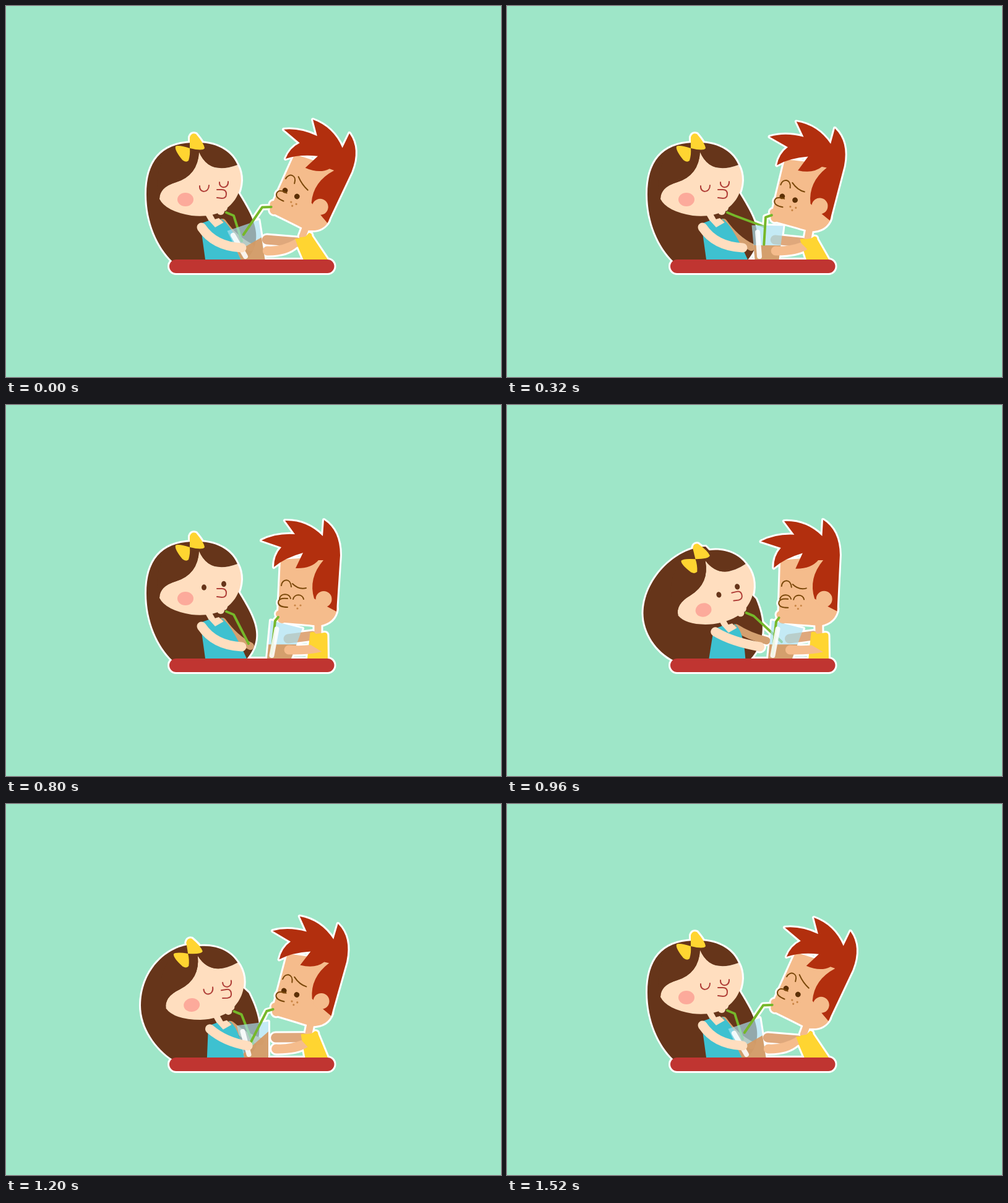
Recreate the animation shown at these times as an HTML page with a canvas. Size 800x600 px, loop 1.6 s.

```html
<!DOCTYPE html>
<html lang="en">
<head>
<meta charset="utf-8">
<title>Shared drink</title>
<style>
html, body { margin: 0; width: 100%; height: 100%; overflow: hidden; background: #9ee6c8; }
canvas { display: block; width: 800px; height: 600px; }
</style>
</head>
<body>
<canvas id="stage" width="800" height="600"></canvas>
<script>
const ctx = document.getElementById('stage').getContext('2d');
const LOOP = 1600, STEP = 80, HALO = 6, BASE = 410;
const C = {
  bg: '#9ee6c8', table: '#c03531', brown: '#66351a', skin: '#ffdebf', shade: '#d4a070',
  teal: '#3ec1d0', yellow: '#ffd531', blush: '#fcaa9b', nose: '#b03f38',
  red: '#b22f0e', tan: '#f5bc8c', tanDark: '#dfa87c', ink: '#7a480a', eye: '#5c3005',
  freckle: '#c98545', straw: '#76b82a', glass: '#a9e0f0', juice: '#d69a62'
};

// neck and lean place the boy, reach bends the girl forward,
// cup / skew / slosh set the glass, tip is the end of the girl's straw.
const hers = { neckX: 480, neckY: 372, lean: 21.5, reach: 0, cup: 399, skew: -16, slosh: .14, tipX: 381, tipY: 380 };
const pull = { neckX: 487, neckY: 375, lean: 10.8, reach: 0, cup: 420, skew: 1, slosh: 0, tipX: 416, tipY: 357 };
const sip = { neckX: 505, neckY: 368, lean: 2.2, reach: 0, cup: 441.5, skew: 12, slosh: -.14, tipX: 386, tipY: 386 };
const rest = { ...sip, lean: 0, slosh: .05, tipX: 392 };
const grab = { ...rest, lean: -1.3, reach: 1, tipX: 462, tipY: 382 };
const tug = { ...hers, neckX: 490, neckY: 370, lean: 12, reach: .48, cup: 404.5, skew: -6, slosh: .3, tipX: 401, tipY: 392 };
const timeline = [[0, hers], [320, pull], [480, sip], [800, rest], [1040, grab], [1200, tug], [1520, hers]];

function poseAt(t) {
  const i = Math.max(1, timeline.findIndex(([at], n) => n && t < at) % timeline.length || 0);
  const last = t >= 1520;
  const [t0, a] = timeline[last ? 5 : i - 1], [t1, b] = timeline[last ? 6 : i];
  const u = Math.min(1, (t - t0) / (t1 - t0)), k = u * u * (3 - 2 * u);
  const p = {};
  for (const key in a) p[key] = a[key] + (b[key] - a[key]) * k;
  if (b === sip) p.neckY -= 8 * Math.sin(Math.PI * u);
  return p;
}

function turn(deg, x, y) {
  const a = deg * Math.PI / 180, c = Math.cos(a), s = Math.sin(a);
  return [x * c - y * s, x * s + y * c];
}

// A head is drawn around a pivot (px, py) that has moved to (x, y) and turned.
function pointOn({ x, y, deg, px, py }, qx, qy) {
  const [dx, dy] = turn(deg, qx - px, qy - py);
  return [x + dx, y + dy];
}

function posed({ x, y, deg, px, py }, draw) {
  ctx.save();
  ctx.translate(x, y);
  ctx.rotate(deg * Math.PI / 180);
  ctx.translate(-px, -py);
  draw();
  ctx.restore();
}

let halo = false;

function fill(color, d, alpha = 1) {
  const p = new Path2D(d);
  ctx.fillStyle = halo ? '#fff' : color;
  ctx.globalAlpha = halo ? 1 : alpha;
  ctx.fill(p);
  if (halo) {
    ctx.strokeStyle = '#fff';
    ctx.lineWidth = HALO;
    ctx.stroke(p);
  }
  ctx.globalAlpha = 1;
}

function line(color, width, d) {
  ctx.strokeStyle = halo ? '#fff' : color;
  ctx.lineWidth = width + (halo ? HALO : 0);
  ctx.stroke(new Path2D(d));
}

function oval(color, x, y, rx, ry = rx) {
  fill(color, `M${x - rx},${y} a${rx},${ry} 0 1 1 ${2 * rx},0 a${rx},${ry} 0 1 1 ${-2 * rx},0Z`);
}

function girlFace(awake) {
  oval(C.skin, 352, 326, 6);
  oval(C.skin, 347, 332, 6);
  fill(C.skin, `M248,312 Q248,293 275,285 Q310,274 312,236 Q328,274 374,257 Q380,268 380,282
    C379,308 364,323 350,332 Q330,342 300,339 Q258,332 248,312Z`);
  fill(C.brown, `M248,312 C235,260 262,221 310,221 C345,221 366,238 374,257
    Q328,274 312,236 Q310,274 275,285 Q248,293 248,312Z`);
  oval(C.blush, 290, 313, 13, 11);
  line(C.nose, 2, 'M341,297 L349,297 Q356,297 356,304 Q356,311 349,311 L341,310');
  if (awake) {
    oval(C.brown, 320, 295, 4, 4.7);
    oval(C.brown, 352, 289.5, 4, 4.7);
  } else {
    line(C.nose, 2, 'M313,291 C312,303 328,303 328,290 M345,285 C344,296 360,296 359,284');
  }
  fill(C.yellow, 'M297,230 L297,212 Q300,204 307,207 Q320,222 321,230 Q318,235 297,230Z');
  fill(C.yellow, 'M297,230 Q278,224 274,227 Q272,233 285,249 Q291,254 295,250 Q298,240 297,230Z');
}

function boyFace(squint, lean) {
  oval(C.tan, 443, 338, 6);
  oval(C.tan, 447, 346, 7);
  fill(C.tan, 'M445,250 L441,335 Q441,350 452,352 Q490,355 507,357 Q533,352 536,330 L520,245Z');
  fill(C.red, `M414,219 Q437,207 468,209 L452,187 Q487,186 513,212 L515,186 Q541,203 541,243 L535,334
    L520,326 L499,313 Q489,280 514,251 L506,251 Q494,265 469,264 L481,239 Q452,247 434,262
    Q434,243 446,230Z`);
  oval(C.tan, 514.5, 314, 13);
  oval(C.tan, 448, 320, 7);
  if (squint) {
    line(C.ink, 2, 'M443,313 C445,304 459,304 461,313 M465,314 C467,305 480,305 482,314');
  } else {
    oval(C.eye, 452, 310, 4.4);
    oval(C.eye, 473.5, 312, 4.4);
  }
  line(C.ink, 2, 'M456,313 Q441,311 441,320 Q442,327 456,327');
  const browY = 289 - .35 * lean;
  line(C.ink, 2, `M446,292 C447,281 461,279 462,294 M464,${browY} Q474,${browY + 10} 486,296`);
  oval(C.freckle, 468, 324, 1.6);
  oval(C.freckle, 477, 324, 1.6);
  oval(C.freckle, 472, 329, 1.6);
}

function girl({ reach: g }, head, awake) {
  const [tx, ty] = pointOn(head, 300 + 24 * g, 221 - 9 * g);
  const lx = 227 - 9 * Math.sin(Math.PI * g), ly = 305 + 43 * g;
  const rx = 374 + 38 * g, ry = 300 + 25 * g * g;
  fill(C.brown, `M${tx},${ty} C${tx - 50},${ty + 2} ${lx},${ly - 53} ${lx},${ly}
    C${lx},${ly + 45 - 18 * g} ${245 - 5 * g},${390 + 12 * g} 269,413 L${388 + 6 * g},412
    C421,${374 + 10 * g} ${rx + 24 - 15 * g},${ry + 40 - 13 * g} ${rx},${ry}Z`);

  const at = (x, y) => `${x + 27 * g},${y + 14 * g}`;
  line(C.shade, 12, `M${at(350, 350)} Q${at(370, 378 - 20 * g)} ${395 + 33 * g},${390 - 12 * g}`);
  line(C.skin, 10, `M${at(327, 336)} L${at(335, 350)}`);
  fill(C.skin, `M${at(327, 348)} L${at(344, 343)} L${at(352, 351)} L${at(338, 359)}Z`);
  fill(C.teal, `M${at(314, 352)} L${at(328, 347)} L${at(338, 358)} L${at(352, 350)} L${at(346, 343)}
    Q${at(362, 350)} ${389 - 5 * g},${BASE} L${322 + 6 * g},${BASE}Z`);
  posed(head, () => girlFace(awake));
}

function boy({ neckX, neckY, lean }, head, left, hand, squint) {
  const rx = neckX + 14.5, ry = neckY - .23 * lean;
  line(C.tanDark, 15, `M${hand} L${left[0] + 4},${left[1] + 5}`);
  line(C.tan, 11, `M${pointOn(head, 505, 350)} L${neckX - 1},${neckY + 1}`);
  fill(C.yellow, `M${left} Q${left[0] + 1},${left[1] - 1} ${left[0] + 6},${left[1] - 1}
    L${neckX - 4},${neckY + 2} L${neckX + 4},${neckY + 1} L${rx - 5},${ry}
    Q${rx},${ry} ${rx},${ry + 5} L520,${BASE} L${487 - .3 * lean},${BASE}Z`);
  posed(head, () => boyFace(squint, lean));
}

function glass({ cup, skew, slosh }, splash) {
  const rim = side => [cup + skew + 25.5 * side, 355 + .55 * skew * side];
  const foot = side => [cup + 19.5 * side, BASE];
  const level = side => {
    const [x, y] = rim(side), k = .58 - slosh * side;
    return [x + (foot(side)[0] - x) * k, y + (BASE - y) * k];
  };
  fill(C.glass, `M${rim(-1)} L${rim(1)} L${foot(1)} L${foot(-1)}Z`, .68);
  if (halo) return;
  fill(C.juice, `M${level(-1)} L${level(1)} L${foot(1)} L${foot(-1)}Z`, .92);
  if (splash) {
    oval(C.juice, cup, 377, 2, 5);
    oval(C.juice, cup + 4, 386, 2);
  }
}

function scene(t) {
  const p = poseAt(t), { neckX, neckY, lean, reach, cup, skew } = p;
  const boyDrinks = t >= 400 && t < 1120;
  const shift = 55 * reach ** 2.3;

  const girlHead = { x: 290 + shift, y: 313 + 25 * reach, deg: -18.7 * reach, px: 290, py: 313 };
  const [ox, oy] = turn(lean, 9, -54);
  const boyHead = { x: neckX + ox, y: neckY + oy, deg: lean, px: 515, py: 314 };
  const left = [neckX - 13.5, neckY + .23 * lean];
  const hand = [neckX - 49 - .45 * lean, 378];

  girl(p, girlHead, boyDrinks);
  boy(p, boyHead, left, hand, boyDrinks);

  // Straws and glass
  const [gx, gy] = pointOn(girlHead, 356, 334);
  line(C.straw, 4, `M${gx},${gy} L${gx + 12},${gy + 5} L${p.tipX},${p.tipY}`);
  glass(p, t >= 480 && t < 640);
  const [bx, by] = pointOn(boyHead, 441, 343);
  line(C.straw, 4, `M${bx},${by} L${bx - 5 - .45 * lean},${by + 6 - .25 * lean}
    L${cup - 4 - .7 * Math.abs(skew)},${402 - 1.5 * lean}`);
  if (!halo) {
    ctx.globalAlpha = .88;
    line('#fff', 8, `M${cup + skew - 16},${366 - .3 * skew} L${cup - 12},405`);
    ctx.globalAlpha = 1;
  }

  // Arms in front of the glass
  const sx = 316 + 28 * reach, sy = 358 + 12 * reach;
  line(C.skin, 15, `M${sx},${sy} Q${sx + 21 + 8 * reach},${sy + 31 - 20 * reach} ${381 + shift},391`);
  const hx = hand[0] + 1, hy = hand[1] + 18;
  const ax = left[0] + 1, ay = 388 - .5 * lean;
  const ex = ax + 18 - .65 * lean, ey = ay + 11;
  fill(C.tan, `M${hx},${hy - 7.5} Q${(hx + ax) / 2},${hy - 6} ${ax},${ay} L${ex},${ey}
    Q${(hx + ex) / 2 + 8},${hy + 8} ${hx},${hy + 7.5} A7.5,7.5 0 0 1 ${hx},${hy - 7.5}Z`);

  fill(C.table, 'M275,410 H519.5 a11,11 0 0 1 0,22 H275 a11,11 0 0 1 0,-22Z');
}

function render(now) {
  const t = Math.floor(now % LOOP / STEP) * STEP;
  ctx.fillStyle = C.bg;
  ctx.fillRect(0, 0, 800, 600);
  ctx.lineCap = ctx.lineJoin = 'round';
  for (halo of [true, false]) scene(t);
}

const start = performance.now();
function tick() {
  render(performance.now() - start);
  requestAnimationFrame(tick);
}
tick();
</script>
</body>
</html>
```
